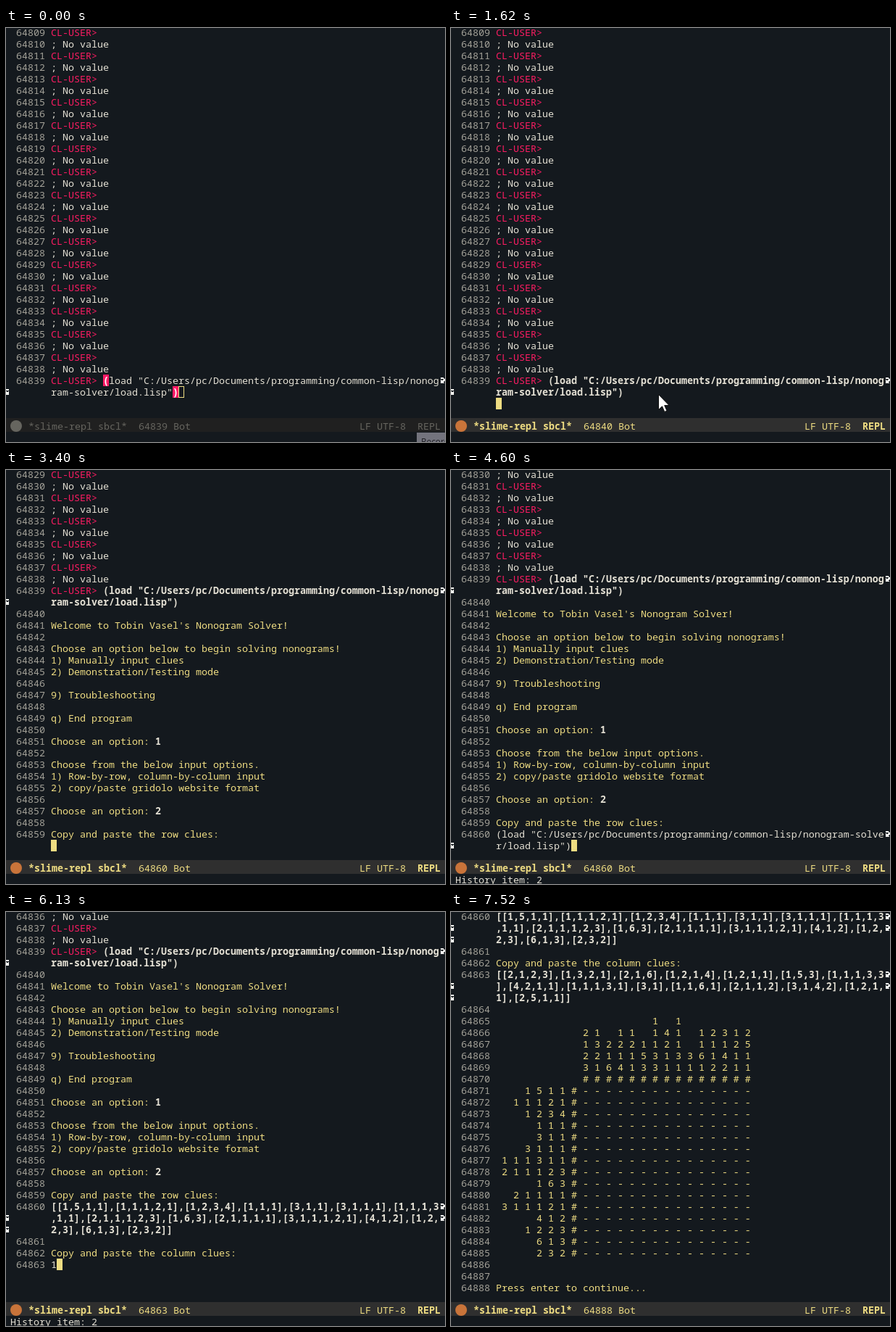
Animation, 606 px wide and 571 px high, one loop 8000 ms. Source, as an HTML page:

```html
<!DOCTYPE html>
<html lang="en">
<head>
<meta charset="utf-8">
<title>Nonogram solver REPL</title>
<style>
  html, body { margin: 0; width: 100%; height: 100%; overflow: hidden; background: #14191e; }
  #stage {
    position: relative; width: 606px; height: 571px; overflow: hidden;
    background: #14191e; color: #e4e0d4;
    font: 13.3333px/16px "Noto Sans Mono", "DejaVu Sans Mono", monospace;
    font-variant-ligatures: none;
  }
  #stage div, #stage svg { position: absolute; white-space: pre; }
  .row { left: 0; width: 606px; height: 16px; }
  .row span { position: absolute; top: 0; height: 16px; }
  .num { left: 14px; color: #a3a198; }
  .prompt { color: #fa1c62; }
  .out { color: #eedc82; }
  .bold { font-weight: bold; }
  .match { background: #ff1a66; color: #fff; font-weight: bold; }
  .curl { top: 4px; width: 8px; height: 8px; fill: #f4f4f0; }
  #cursor { width: 8px; height: 16px; background: #eedc82; box-sizing: border-box; }
  #cursor.hollow { background: none; border: 1px solid #eedc82; }
  #mode { left: 0; top: 538px; width: 606px; height: 19px; background: #2f2f2f; color: #eedc82; }
  #mode div { top: 3px; }
  #mode b { font-weight: bold; }
  #mode #dot { left: 6px; width: 16px; height: 16px; border-radius: 50%; background: #c9743a; }
  #mode.idle { background: #202020; color: #66655f; }
  #mode.idle b { font-weight: normal; }
  #mode.idle #dot { background: #66655f; }
  #echo { left: 6px; top: 557px; }
  #panel {
    left: 567px; top: 558px; width: 60px; height: 30px; background: #73737d;
    color: #1d1d22; font: 12px/16px "Open Sans", sans-serif; text-indent: 6px; padding-top: 5px;
  }
  #mouse { left: 0; top: 0; width: 18px; height: 28px; overflow: visible; }
</style>
</head>
<body>
<div id="stage">
  <div id="rows"></div>
  <div id="cursor"></div>
  <div id="mode">
    <div id="dot"></div>
    <div style="left:31px"><b>*slime-repl sbcl*</b></div>
    <div style="left:183px" id="place"></div>
    <div style="left:488px">LF UTF-8</div>
    <div style="left:568px"><b>REPL</b></div>
  </div>
  <div id="echo"></div>
  <div id="panel">Recorder</div>
  <svg id="mouse"><path d="M.5 .5V21.5L5.5 16.8L8.8 24.4L12 23L8.7 15.5H15Z" fill="#fff" stroke="#111" stroke-width="1"/></svg>
</div>
<script>
(() => {
const $ = id => document.getElementById(id);
const LOOP = 8000, COLS = 67, ROWS = 33, CELL = 8, LINE = 16, LEFT = 62, TOP = -2, FIRST = 64809;
const FOCUS = 770, TYPING = 2810;
const BLINKS = [[1950, 2480], [3930, 4200], [7520, LOOP]];
const LOAD = '(load "C:/Users/pc/Documents/programming/common-lisp/nonogram-solver/load.lisp")';

const rowClues = "1511 11121 1234 111 311 3111 111311 211123 163 21111 311121 412 1223 613 232".split(" ");
const colClues = "2123 1321 216 1214 1211 153 11133 4211 11131 31 1161 2112 3142 1211 2511".split(" ");
const listing = clues => "[" + clues.map(c => "[" + [...c].join(",") + "]").join(",") + "]";
const ROW_TEXT = listing(rowClues), COL_TEXT = listing(colClues);

function board() {
  const indent = " ".repeat(15), grid = [];
  for (let i = 0; i < 5; i++)
    grid.push(indent + colClues.map(c => c.padStart(5)[i]).join(" "));
  grid.push(indent + colClues.map(() => "#").join(" "));
  for (const c of rowClues)
    grid.push(" " + [...c.padStart(6)].join(" ") + " # " + colClues.map(() => "-").join(" "));
  return grid.join("\n");
}

// The buffer is a list of lines; a line is a list of [class, text] runs.
const lines = [[]], states = [];
let topRow = 0;

function add(cls, text) {
  text.split("\n").forEach((part, i) => {
    if (i) lines.push([]);
    if (part) lines[lines.length - 1].push([cls, part]);
  });
}
const say = text => add("out", text);
const enter = text => add("bold", text + "\n");

function wrap(runs, n, last) {
  const chars = runs.flatMap(([cls, text]) => [...text].map(ch => [cls, ch]));
  const rows = [];
  for (let i = 0; i === 0 || i < chars.length; i += COLS) {
    const parts = [];
    chars.slice(i, i + COLS).forEach(([cls, ch], col) => {
      const end = parts[parts.length - 1];
      if (end && end.cls === cls) end.text += ch;
      else parts.push({ cls, col, text: ch });
    });
    rows.push({
      parts, len: Math.min(COLS, chars.length - i),
      num: i || (last && !chars.length) ? "" : FIRST + n,
      before: i > 0, after: i + COLS < chars.length
    });
  }
  return rows;
}

function snap(at, input = "", echo = "", match = false) {
  const typed = match
    ? [["match", "("], ["", input.slice(1, -1)], ["match", ")"]]
    : [["", input]];
  const end = lines.length - 1;
  const all = lines.flatMap((runs, n) => wrap(n === end ? runs.concat(typed) : runs, n, n === end));
  topRow = Math.max(topRow, all.length - ROWS);
  states.push({ at, echo, rows: all.slice(topRow), place: FIRST + end + " Bot" });
}
const recall = (at, item, input, match) => snap(at, input, "History item: " + item, match);

for (let n = 0; n < 15; n++) {
  add("prompt", "CL-USER>\n");
  add("", "; No value\n");
}
add("prompt", "CL-USER> ");
snap(0, LOAD, "", true);
enter(LOAD);
snap(1360);
say("\nWelcome to Tobin Vasel's Nonogram Solver!\n\nChoose an option below to begin solving nonograms!\n" +
    "1) Manually input clues\n2) Demonstration/Testing mode\n\n9) Troubleshooting\n\nq) End program\n\n");
snap(1690);
say("Choose an option: ");
snap(1750);
snap(TYPING, "1");
enter("1");
say("\nChoose from the below input options.\n1) Row-by-row, column-by-column input\n" +
    "2) copy/paste gridolo website format\n\nChoose an option: ");
snap(3070);
snap(3270, "2");
enter("2");
say("\nCopy and paste the row clues:\n");
snap(3400);
[[4200, "2"], [4400, "1"], [4600, LOAD], [4730, COL_TEXT], [4930, ROW_TEXT]]
  .forEach(([at, text], i) => recall(at, i, text));
enter(ROW_TEXT);
say("\nCopy and paste the column clues:\n");
snap(5330);
[[5800, ROW_TEXT], [5930, "2"], [6130, "1"], [6330, LOAD]]
  .forEach(([at, text], i) => recall(at, i, text));
recall(6460, 3, LOAD, true);
recall(6530, 4, COL_TEXT);
enter(COL_TEXT);
snap(6990);
say("\n" + board() + "\n\n\nPress enter to continue...");
snap(7060);

const CURL = "M2 0h4v2h-4v1h1v1h2v-1h1v5h-5v-1h1v-1h-1v-1h-1v-3h1v-1h1z";
const curl = (x, flip) =>
  `<svg class="curl" style="left:${x}px"><path d="${CURL}"${flip ? ' transform="translate(8) scale(-1 1)"' : ""}/></svg>`;

function rowHtml(row, i) {
  const text = row.parts.map(p =>
    `<span class="${p.cls}" style="left:${LEFT + p.col * CELL}px">${p.text.replace(/>/g, "&gt;")}</span>`).join("");
  return `<div class="row" style="top:${TOP + i * LINE}px"><span class="num">${row.num}</span>${text}` +
    (row.before ? curl(-2, false) : "") + (row.after ? curl(598, true) : "") + "</div>";
}

let shown = null;
function show(state) {
  if (state === shown) return;
  shown = state;
  const last = state.rows.length - 1;
  $("rows").innerHTML = state.rows.map(rowHtml).join("");
  $("place").textContent = state.place;
  $("echo").textContent = state.echo;
  $("cursor").style.left = LEFT + state.rows[last].len * CELL + "px";
  $("cursor").style.top = TOP + last * LINE + "px";
}

function moveMouse(t) {
  const step = t >= 900 ? 11 : Math.floor((t - 70) / 76);
  const rest = (1 - step / 11) ** 2;
  $("mouse").style.visibility = t >= 70 && t < TYPING ? "visible" : "hidden";
  $("mouse").style.transform = `translate(${Math.round(286 + 300 * rest)}px, ${Math.round(505 + 66 * rest)}px)`;
}

function draw(t) {
  show(states.filter(s => s.at <= t).pop());
  const idle = t < FOCUS;
  $("mode").className = idle ? "idle" : "";
  $("cursor").className = idle ? "hollow" : "";
  $("cursor").style.visibility = BLINKS.some(([a, b]) => t >= a && t < b) ? "hidden" : "visible";
  $("panel").style.opacity = Math.max(0, Math.min(1, (270 - t) / 200));
  moveMouse(t);
}

const start = performance.now();
function tick() {
  draw((performance.now() - start) % LOOP);
  requestAnimationFrame(tick);
}
tick();
})();
</script>
</body>
</html>
```
